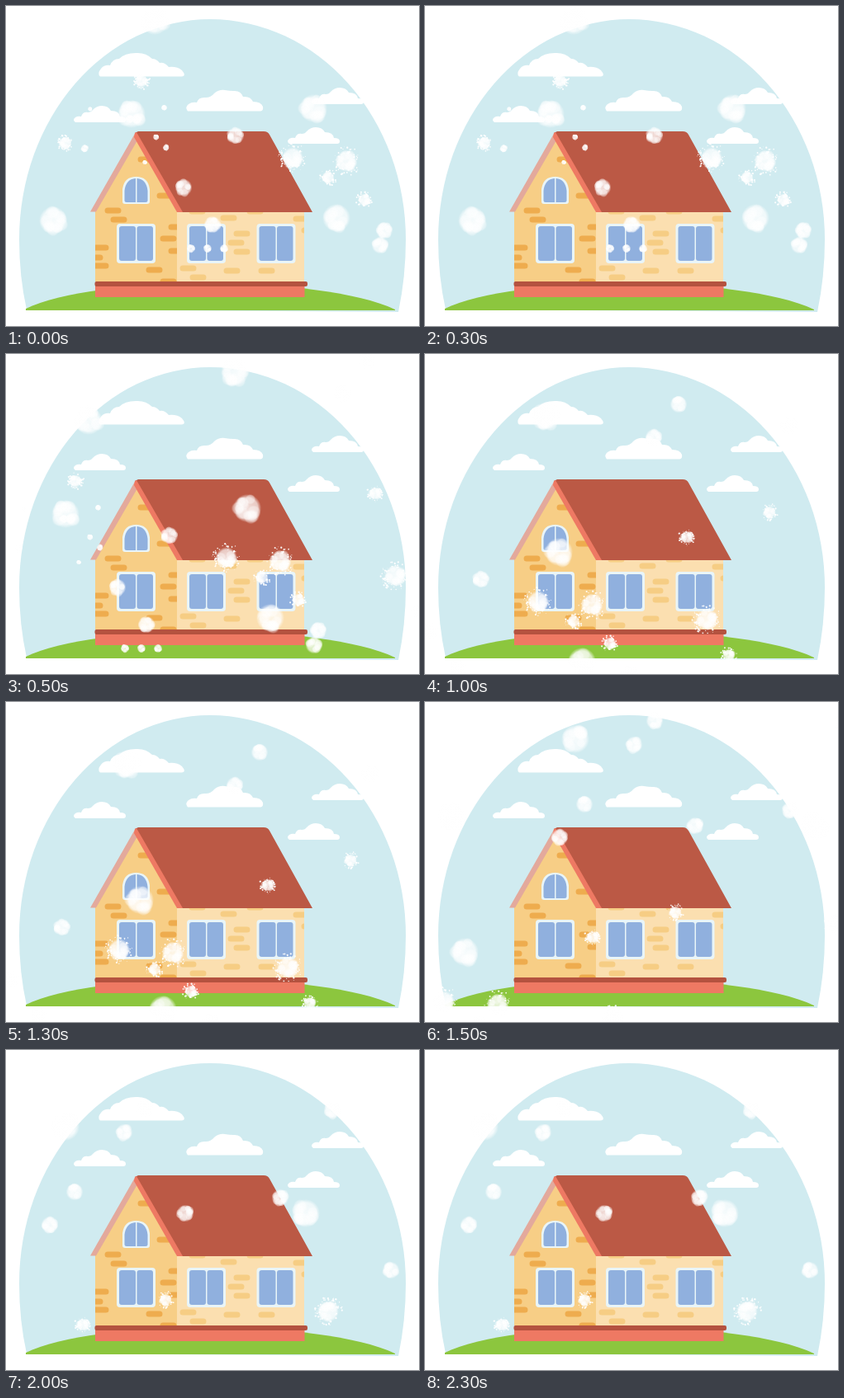
An HTML page with a canvas that plays this animation: 500x388 px, repeating every 2500 ms.

```html
<!DOCTYPE html>
<html lang="en">
<head>
<meta charset="utf-8">
<title>House in the snow</title>
<style>
  html, body { margin: 0; width: 100%; height: 100%; overflow: hidden; background: #fff; }
  svg, canvas { position: absolute; left: 0; top: 0; width: 500px; height: 388px; }
  .bricks { fill: none; stroke-width: 7; stroke-linecap: round; }
</style>
</head>
<body>
<svg viewBox="0 0 500 388">
  <defs>
    <path id="cloud" d="M2 20Q-2 17 2 14Q5 12 9 13Q11 7 17 8Q21 8 23 5Q28 0 34 0Q42 0 45 6Q55 6 56 13Q63 13 63 17Q63 20 60 20Z"/>
    <g id="window">
      <rect width="47" height="48" rx="4" fill="#e9f5f8"/>
      <rect x="3" y="3" width="20" height="42" rx="3"/>
      <rect x="24.5" y="3" width="19.5" height="42" rx="3"/>
    </g>
    <clipPath id="frontClip"><path id="front" d="M158 160L207 249V334H108V249Z"/></clipPath>
    <clipPath id="sideClip"><path id="side" d="M207 249H361V334H207Z"/></clipPath>
  </defs>

  <path fill="#d0ebf0" d="M25 368Q16 328 16 283A231 267 0 0 1 247 16A237 267 0 0 1 484 283Q484 328 475 371Z"/>
  <g fill="#fff">
    <path d="M114 85.500Q110 82 115 76Q119 71 126 72Q129 64 137 64Q144 57 157 57Q169 56 177 64Q182 64 186 69Q192 68 197 74Q207 73 213 78Q219 85 213 85.500Z"/>
    <path d="M220 127.500Q216 123 221 119Q225 116 231 117Q233 110 242 111Q248 111 252 106Q258 101 265 102Q271 103 275 103Q284 102 287 110Q296 109 299 116Q309 116 311 122Q312 127 308 127.500Z"/>
    <use href="#cloud" x="82" y="121"/>
    <use href="#cloud" x="370" y="99"/>
    <use href="#cloud" x="341" y="147"/>
  </g>
  <path fill="#8cc63e" d="M24 369V367C110 326 380 326 471 368V369Z"/>

  <use href="#front" fill="#f7ce86"/>
  <use href="#side" fill="#fbdfb0"/>
  <path class="bricks" stroke="#eeac4e" clip-path="url(#frontClip)"
    d="M163 186h13M186 230h13M123 248h13m-6 11h13M200 268h13m-23 14h13m-3 15h13M108 293h13m-20 12h13m-6 10h13M173 320h13m4 14h13"/>
  <path class="bricks" stroke="#f6cd84" clip-path="url(#sideClip)"
    d="M225 249h13m25 8h13m19 -8h13m43 9h13M361 272h13M279 276h13m-20 11h13m-6 11h13M214 318h13m-1 11h13M267 321h13m29 0h13"/>

  <path fill="#e3a99c" d="M157 153L102 249.500H109L159 163Z"/>
  <path fill="#bb5945" d="M160 152H312Q317 152 319 156L371 250H211L156 154Z"/>
  <path fill="#ee7963" d="M156 154L158 153L214 250H207L155 159Z"/>

  <g fill="#90b0de">
    <use href="#window" x="134" y="264"/>
    <use href="#window" x="219" y="264"/>
    <use href="#window" x="303.500" y="264"/>
    <path fill="#e9f5f8" d="M141 237V222Q143 207 157.500 207Q172 207 174 222V237Q174 240 171 240H144Q141 240 141 237Z"/>
    <path d="M143.500 236V224Q145 210 157 209V238H146Q143.500 238 143.500 236ZM158.500 209Q170 210 171.500 224V236Q171.500 238 169 238H158.500Z"/>
  </g>

  <rect x="108" y="339" width="253.500" height="14" fill="#ee7963"/>
  <rect x="107.500" y="334" width="257.500" height="6" rx="2" fill="#b4523f"/>
</svg>
<canvas id="snow" width="500" height="388"></canvas>

<script>
const ctx = document.getElementById("snow").getContext("2d");

function random(seed) {
  return () => {
    seed = (seed * 16807) % 2147483647;
    return seed / 2147483647;
  };
}

// Larger flakes, grouped by look, where they stand at time 0
const flakes = [];
function add(draw, r, points) {
  for (const [x, y] of points) flakes.push({ draw, r, x, y });
}
add(puff, 18, [[180, 18], [152, 131], [372, 124], [400, 257], [57, 260], [357, -41], [506, -134], [797, -29]]);
add(puff, 11, [[278, 157], [458, 272], [453, 290], [215, 220], [250, 265], [517, -55], [487, -15],
               [602, -156], [577, -127], [651, -29], [766, -48], [829, -154], [900, 40]]);
add(splat, 17, [[347, 184], [412, 188], [551, 206], [824, 90]]);
add(splat, 10, [[164, 91], [72, 166], [390, 208], [434, 235], [527, 106], [578, 249], [627, 76]]);

// Tiny flakes: a row of three and a loose flurry
for (let i = 0; i < 3; i++) add(puff, 5.5, [[224 + 20 * i, 294]]);
const scatter = random(424242);
for (let i = 0; i < 8; i++)
  add(puff, 3 + 3 * scatter(), [[62 + 140 * scatter(), 118 + 80 * scatter()]]);

// Wind carries all flakes together, one gust per step
const drift = [[0, 0], [-80, 63], [-210, 116], [-324, 179], [-434, 227]];

function softDot(x, y, r, alpha) {
  const g = ctx.createRadialGradient(x, y, 0, x, y, r);
  g.addColorStop(0, `rgba(255,255,255,${alpha})`);
  g.addColorStop(0.75, `rgba(255,255,255,${alpha * 0.85})`);
  g.addColorStop(1, "rgba(255,255,255,0)");
  ctx.fillStyle = g;
  ctx.fillRect(x - r, y - r, 2 * r, 2 * r);
}

function puff(x, y, r, rnd) {
  softDot(x, y, r * 0.95, 0.8);
  for (let i = 0; i < 12; i++) {
    const a = rnd() * 2 * Math.PI, d = r * (0.4 + 0.25 * rnd());
    softDot(x + d * Math.cos(a), y + d * Math.sin(a), r * (0.3 + 0.2 * rnd()), 0.45);
  }
}

function splat(x, y, r, rnd) {
  puff(x, y, r * 0.8, rnd);
  ctx.fillStyle = "rgba(255,255,255,.9)";
  for (let i = 0; i < r * 4; i++) {
    const a = rnd() * 2 * Math.PI, d = r * (0.55 + 0.5 * rnd());
    ctx.beginPath();
    ctx.arc(x + d * Math.cos(a), y + d * Math.sin(a), 0.4 + 0.8 * rnd(), 0, 7);
    ctx.fill();
  }
}

function drawSnow(step) {
  const [dx, dy] = drift[step];
  ctx.clearRect(0, 0, 500, 388);
  flakes.forEach(({ draw, r, x, y }, i) => draw(x + dx, y + dy, r, random(7919 * (i + 1))));
}

let shown = -1;
function tick() {
  const step = Math.floor(performance.now() % 2500 / 500);
  if (step !== shown) drawSnow(shown = step);
  requestAnimationFrame(tick);
}
tick();
</script>
</body>
</html>
```
